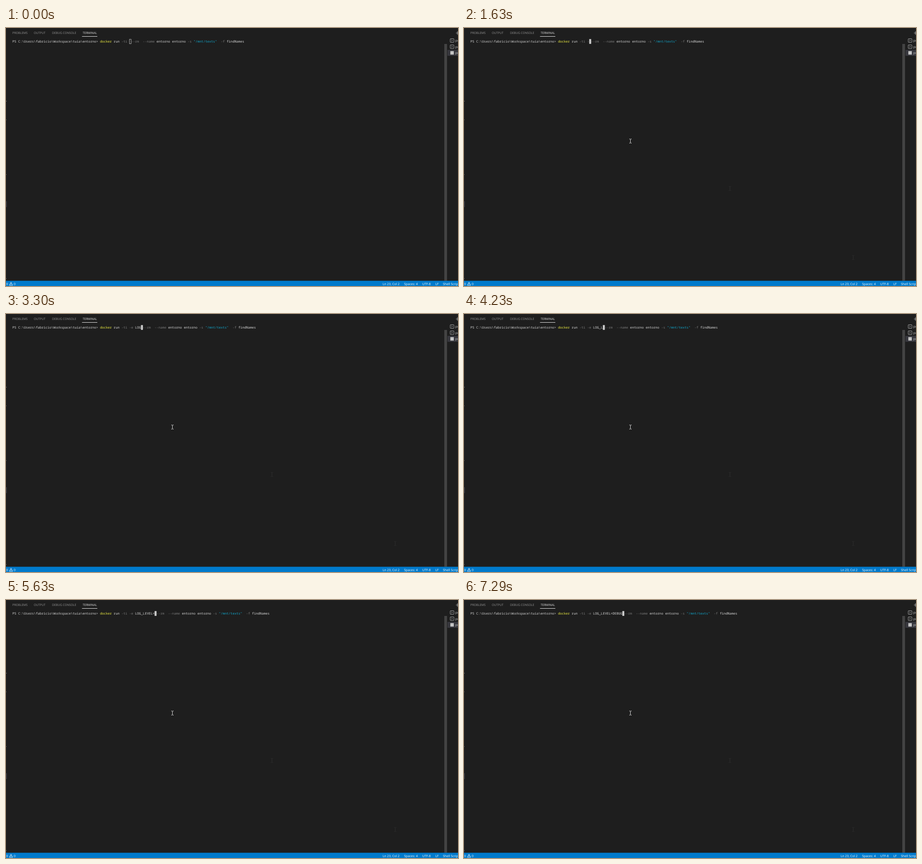
These frames come from a looping animation (990x566 px, 8000 ms). An HTML page:

```html
<!DOCTYPE html>
<html lang="en">
<head>
<meta charset="utf-8">
<title>Terminal</title>
<style>
  html, body { margin: 0; width: 100%; height: 100%; overflow: hidden; background: #1e1e1e; }
  svg { display: block; }
  text { white-space: pre; text-rendering: geometricPrecision; }
  .ui { font-family: "Open Sans", "Noto Sans", sans-serif; }
  .tabs { font-size: 6.45px; fill: #979797; }
  .status { font-size: 6.9px; fill: #fff; }
  .list { font-size: 7.2px; fill: #ccc; }
  .mono { font-family: "Noto Sans Mono", "DejaVu Sans Mono", monospace; font-size: 7.111px; }
  .line { fill: none; stroke: #c5c5c5; stroke-width: .8; }
</style>
</head>
<body>
<svg width="990" height="566" viewBox="0 0 990 566">
  <defs>
    <path id="beam" d="M-2.5 -4.5H-.5M.5 -4.5H2.5M0 -4V4M-2.5 4.5H-.5M.5 4.5H2.5" fill="none"/>
    <g id="shell" class="line">
      <rect x=".5" y=".5" width="8" height="8" rx="1"/>
      <path d="M3 2.5L5.3 4.5L3 6.5"/>
    </g>
  </defs>
  <rect width="990" height="566" fill="#1e1e1e"/>

  <g class="ui tabs">
    <text x="14" y="13.4">PROBLEMS</text>
    <text x="61" y="13.4">OUTPUT</text>
    <text x="101" y="13.4">DEBUG CONSOLE</text>
    <text x="168" y="13.4" fill="#e7e7e7">TERMINAL</text>
  </g>
  <rect x="166.5" y="18" width="33.5" height="1" fill="#e7e7e7"/>

  <!-- left edge remnants -->
  <g fill="#8a8a8a">
    <rect y="160" width="1.5" height="1"/>
    <rect y="201" width="1" height="1"/>
    <rect y="321" width="1" height="1"/>
    <rect y="549" width="1" height="1"/>
  </g>
  <rect y="380" width="2" height="13" fill="#37373d"/>

  <!-- terminal list -->
  <rect x="960" y="35" width="6" height="519.5" fill="#434343"/>
  <rect x="967" y="48" width="23" height="13" fill="#37373d"/>
  <path class="line" d="M985.5 11H990M988.7 7V15"/>
  <use href="#shell" x="972.5" y="23"/>
  <use href="#shell" x="972.5" y="36.5"/>
  <rect x="973.2" y="50.7" width="7.6" height="7.6" fill="#c5c5c5"/>
  <g class="ui list">
    <text x="984" y="30.3">powershell</text>
    <text x="984" y="43.8">powershell</text>
    <text x="984" y="57.3">powershell</text>
  </g>

  <rect y="554.5" width="990" height="11.5" fill="#007acc"/>
  <g class="ui status">
    <text x=".5" y="564">0</text>
    <path d="M11 557.7L14.7 564.2H7.3ZM11 559.8V562M11 562.6V563.4" fill="none" stroke="#fff" stroke-width=".8"/>
    <text x="17" y="564">0</text>
    <text x="825" y="564">Ln 23, Col 2</text>
    <text x="872" y="564">Spaces: 4</text>
    <text x="911.7" y="564">UTF-8</text>
    <text x="940.5" y="564">LF</text>
    <text x="957" y="564">Shell Script</text>
  </g>

  <g id="cmd" class="mono"></g>
  <rect id="caret" y="24.5" height="10"/>
  <g stroke="#2d2d2d">
    <use id="trailA" href="#beam" x="852.5" y="503.5"/>
    <use id="trailB" href="#beam" x="582.5" y="352"/>
  </g>
  <use id="pointer" href="#beam" stroke="#e0e0e0"/>
</svg>
<script>
const LOOP = 8000, LEFT = 14, CELL = 4.2667, FOCUS = 710;
const PROMPT = "PS C:\\Users\\fabricio\\Workspace\\tuia\\entorno> ";
const HEAD = "docker run -ti ";
const TAIL = ' --rm  --name entorno entorno -s "/mnt/texts"  -f findNames';
const TYPED = "-e LOG_LEVEL=DEBUG";
// moment of each keystroke
const KEYS = [1630, 1760, 2490, 2950, 3170, 3300, 3630, 4230, 4300, 4490,
  4690, 4830, 5630, 6090, 6230, 6500, 6830, 7290];
// time, x, y
const MOVES = [[130, 947, 561], [190, 852.5, 503.5], [250, 705, 421], [310, 582.5, 352],
  [370, 364.5, 248], [570, 369, 252], [640, 364.5, 248]];

const $ = id => document.getElementById(id);
const set = (el, attrs) => { for (const k in attrs) el.setAttribute(k, attrs[k]); };
const cellX = n => LEFT + n * CELL;

function addText(cell, text, fill) {
  const el = document.createElementNS("http://www.w3.org/2000/svg", "text");
  set(el, { x: cellX(cell), y: 32.2, fill });
  el.textContent = text;
  $("cmd").append(el);
}

function tint(word, index) {
  if (index === 0) return "#f5f543";
  if (word[0] === "-") return "#7a7a7a";
  if (word[0] === '"') return "#11a8cd";
  return "#d8d8d8";
}

function drawCommand(count) {
  $("cmd").replaceChildren();
  addText(0, PROMPT, "#d8d8d8");
  const line = HEAD + TYPED.slice(0, count) + TAIL;
  for (const m of line.matchAll(/\S+/g))
    addText(PROMPT.length + m.index, m[0], tint(m[0], m.index));
}

function drawCaret(count, focused) {
  const x = cellX(PROMPT.length + HEAD.length + count);
  set($("caret"), focused
    ? { x, y: 24.3, width: CELL, height: 10.5, fill: "#cccccc", stroke: "none" }
    : { x: x + .3, y: 24.8, width: CELL - .5, height: 9.7, fill: "none", stroke: "#cccccc", "stroke-width": .8 });
}

let shown = -1;
function frame() {
  const t = performance.now() % LOOP;
  const count = KEYS.filter(k => k <= t).length;
  if (count !== shown) drawCommand(shown = count);
  drawCaret(count, t >= FOCUS);

  const spot = MOVES.filter(m => m[0] <= t).pop();
  set($("pointer"), { visibility: spot ? "visible" : "hidden" });
  if (spot) set($("pointer"), { x: spot[1], y: spot[2] });
  set($("trailA"), { visibility: t >= 250 ? "visible" : "hidden" });
  set($("trailB"), { visibility: t >= 370 ? "visible" : "hidden" });
  requestAnimationFrame(frame);
}
frame();
</script>
</body>
</html>
```
